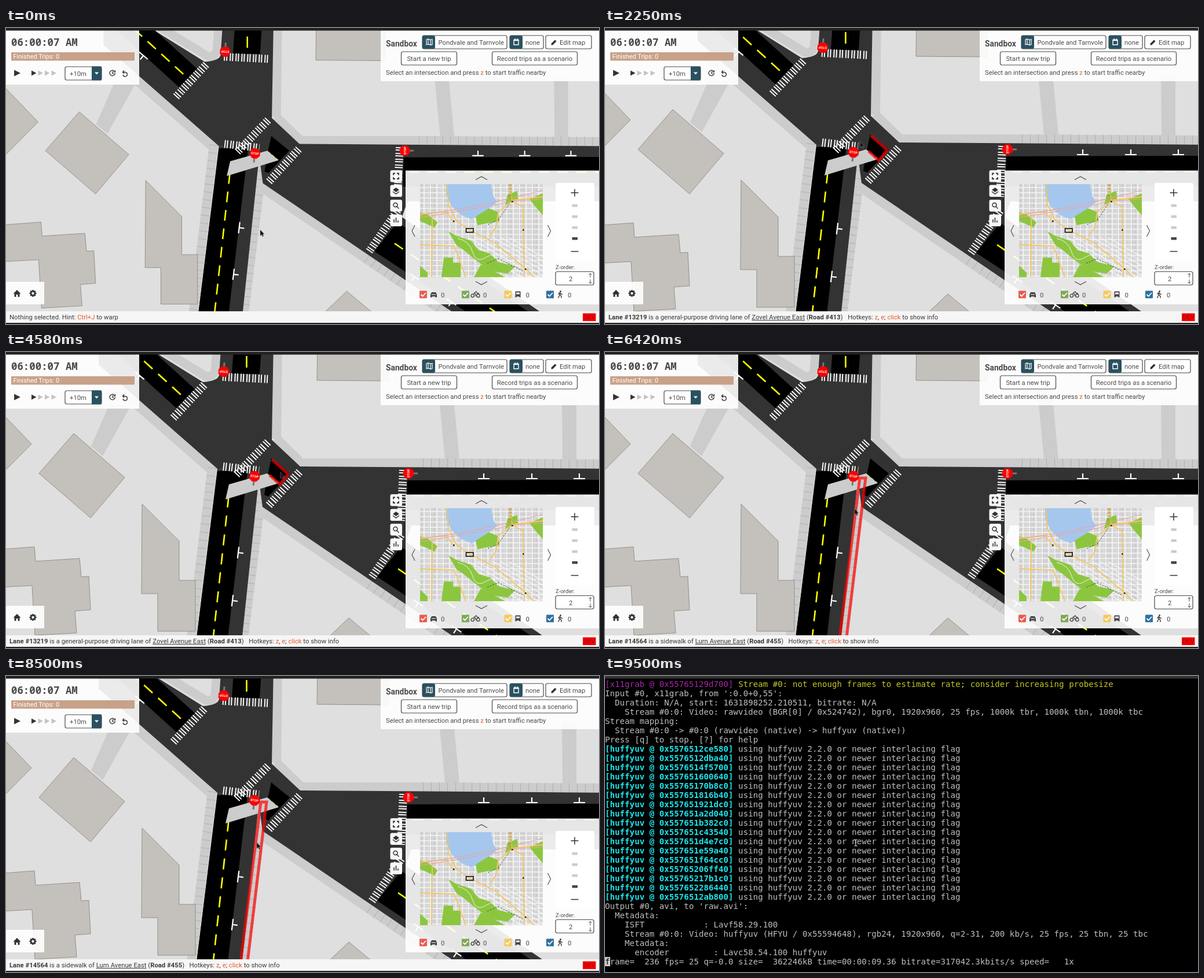
These frames come from a looping animation (1024 px wide and 512 px high, 9.66 s). An HTML page:

```html
<!DOCTYPE html>
<html>
<head>
<meta charset="utf-8">
<style>
html, body { margin: 0; width: 100%; height: 100%; overflow: hidden; background: #222 }
svg, #hint, #term { position: absolute; left: 0; top: 0 }
svg text { font: 11.3px Roboto, sans-serif; fill: #4a4a4a }
#hint { left: 6px; top: 490px; font: 11.3px/22px Roboto, sans-serif; color: #3a3a3a; white-space: pre }
#hint i, tspan { font-style: normal; color: #e8572a; fill: #e8572a }
#term { margin: 0; width: 1024px; height: 506px; padding-top: 6px; background: #000; color: #bebebe;
  font: 14.17px/16px "DejaVu Sans Mono", monospace; overflow: hidden }
#term b { color: #1ce4ea }
#term s { text-decoration: none; color: #a626a6 }
#term u { text-decoration: none; color: #c4c426 }
#term i { font-style: normal; color: #000; background: #ccc }
</style>
</head>
<body>
<svg id="stage" width="1024" height="512" viewBox="0 0 1024 512"></svg>
<div id="hint"></div>
<pre id="term"></pre>
<svg width="1024" height="512">
  <rect id="strip" width="1024" height="4.5" fill="#222"/>
  <path id="arrow" d="M0 0V10.5L2.4 8.4L4 11.8L5.8 11L4.2 7.7H7.2Z" fill="#111" stroke="#999" stroke-width=".5"/>
  <path id="beam" d="M-3 -5h2l1 1l1-1h2M0-4V5M-3 6h2l1-1l1 1h2" fill="none" stroke="#ccc" stroke-width="1.2"/>
</svg>
<script>
const $ = id => document.getElementById(id);
const fill = (d, color, more = '') => `<path d="M${d}Z" fill="${color}" ${more}/>`;
const line = (d, color, width = 1, dash = '', more = '') =>
  `<path d="M${d}" fill="none" stroke="${color}" stroke-width="${width}" stroke-dasharray="${dash}" ${more}/>`;
const box = (x, y, w, h, color, more = '') =>
  `<rect x="${x}" y="${y}" width="${w}" height="${h}" fill="${color}" ${more}/>`;
const text = (x, y, s, more = '') => `<text x="${x}" y="${y}" ${more}>${s}</text>`;
const range = (a, b, step, f) => {
  let out = '';
  for (let v = a; v < b; v += step) out += f(v);
  return out;
};

const ROAD = '#333', WALK = '#ccc', LAND = '#dfdfdf', INK = '#4a4a4a', TEAL = '#2a5160';

// ---- street map ----
const walk = (d, ticks = true) => line(d, WALK, 16) + (ticks ? line(d, '#b0b0b0', 16, '1 13') : '');
const zebra = d => line(d, '#fff', 14, '1.9 2.3 1.9 4.2');
const building = d => fill(d, '#c4c1bc', 'stroke="#958f86"');
const bay = (x, y, turn) =>
  `<g transform="translate(${x} ${y}) rotate(${turn})">${line('-10 0h20M0 0v-9', '#fff', 2.2)}</g>`;
const stop = (x, y, turn) => {
  const corners = [...Array(8)].map((_, i) => {
    const a = (i + .5) * Math.PI / 4;
    return `${(9.8 * Math.cos(a)).toFixed(1)} ${(9.8 * Math.sin(a)).toFixed(1)}`;
  });
  return `<g transform="translate(${x} ${y}) rotate(${turn})">${line('0 8V16', '#777', 3)}
    ${fill(corners.join('L'), '#f80000')}
    ${text(0, 2, 'STOP', 'text-anchor="middle" style="font-size:5.6px;font-weight:700;fill:#fff"')}</g>`;
};

const streets = [
  box(-40, -20, 1104, 560, LAND),
  fill('748 80L773 80L783 186L758 186', WALK), fill('960 80H985V186H961', WALK),
  fill('178 92L216 92L167 180L147 163', WALK),
  // walks
  walk('180 51L359 208', false), walk('356 200L317 520'), walk('446 205L407 520'),
  walk('469 -20L467 150', false), walk('466 149L510 192L720 192', false), walk('720 192L1064 194'),
  walk('437 273L627 403', false), walk('627 403L800 521'),
  line('250 -16L345 42Q356 44 361 34L365 -20', WALK, 15),
  // pavement
  fill('160 22L365 202L438 206L405 520L326 520L365 202', ROAD),
  fill('160 -62L255 -1L340 52Q366 50 368 40L372 -20H462L459 152L508 198L1064 202V300H700L690 328L1064 585H850V545L443 268L435 208L365 202L160 22', ROAD),
  // driving lanes
  fill('180 -7L294 97L326 64L180 -69', '#000'), fill('394 -20H442L438 38H390', '#000'),
  fill('365 206L417 206L380 520L326 520', '#000'), fill('458 184L490 210L453 250L446 247L452 212', '#000'),
  fill('693 222L1064 221V274H692', '#000'), fill('641 389L682 337L1000 555L900 560', '#000'),
  // centre lines
  line('197 -22L302 74', '#ff0', 2.6, '20 13', 'stroke-dashoffset="10"'),
  line('415.5 -10V27', '#ff0', 2.6, '20 14', 'stroke-dashoffset="17"'),
  line('384.5 250L355 520', '#ff0', 2.6, '19 14'), line('677 375L900 527', '#ff0', 2.6, '18 16'),
  line('702 248.5H1064', '#ff0', 2, '19 14'),
  // traffic island
  fill('385 229L451 210L471 227L379 255', WALK), line('453 212L470 226', '#dd5', 1, '5 4'),
  ['289 114L345 54', '374 43L456 47', '398 212L454 154', '375 198L437 205', '454 265L508 206', '686 204L682 292',
    '632 389L684 314'].map(zebra).join(''),
  [825, 908, 990].map(x => bay(x, 219, 0)).join(''),
  bay(401, 347, 97), bay(391, 430, 97), bay(231, 41, 220), bay(712, 434, 214), bay(778, 479, 214),
  // buildings
  ['-30 82L44 159L-30 234', '117 141L205 217L146 287L57 210', '235 263L299 327V395H327V483H262V418H234',
    '-30 343L49 337L51 362L127 357L130 389L143 388L146 446L119 448L122 486L50 490L45 404L-30 408',
    '538 -20H660V50L537 49', '592 460L640 500L550 500'].map(building).join(''),
  stop(376, 34, 184), stop(429, 215, 7), stop(695, 210, -90)
].join('');

// ---- overview map ----
const overview = `<clipPath id="inset"><rect x="715" y="270" width="212" height="161"/></clipPath>
  <g clip-path="url(#inset)">` + [
  box(715, 270, 212, 161, '#d5d5d5'),
  range(718, 930, 5.5, x => line(`${x} 270V431`, x % 2 < 1 ? '#c4c4c4' : '#dedede', 1.6, '3 1.5')),
  range(276, 431, 9, y => line(`715 ${y}H927`, '#f6f6f6', 1.3)),
  range(722, 930, 11, x => line(`${x} 270V431`, '#f6f6f6', 1.5)),
  range(0, 8, 1, i => line(`${770 + i * 14} 362L${900 + i * 14} 436`, '#f6f6f6', 1.4)),
  fill('760 270H838L841 290L848 301L822 322L804 331L785 323L769 308L760 288', '#a5c7ee'),
  ['811 326L834 312L849 318L852 334L814 341', '904 296L927 286V324L915 310', '866 288L883 282L884 296L862 306',
    '715 319L727 322L745 336L740 345L715 334',
    '764 352L779 360L803 368L816 384L836 390L850 405L880 412L866 425L836 420L812 402L790 384L778 376',
    '756 397H772V406H785V431H752', '820 409L862 431H808', '715 411L728 423V431H715'].map(d => fill(d, '#8cc63f')).join(''),
  line('780 364Q800 368 806 388T830 396T868 402L880 416', '#eef4e4', 1),
  line('832 340L850 332L870 303M831 407L850 399L892 420', '#375a36', 1, '3 2'),
  ['762 270L764 305L778 334L800 349L845 372L899 418L912 431', '870 270L874 300L850 318L846 345L835 360',
    '874 300L893 309L895 431', '874 298L927 292', '715 322L760 318L774 336', '715 375L774 377L794 431',
    '736 323L735 431'].map(d => line(d, '#f5c65d', 1.8)).join(''),
  line('715 324L790 312L870 295L927 281M715 328L800 314L880 299L927 296', '#eda0a0', 1.1),
  line('869 270V296M872 270V296', '#a3802c', 1, '4 2'),
  [[874, 300], [897, 417], [773, 334], [893, 349]].map(([x, y]) => box(x - 1, y - 1, 2.5, 2.5, '#222')).join(''),
  box(794.5, 346.8, 12.5, 6.6, 'none', 'stroke="#000" stroke-width="1.5"')
].join('') + '</g>';

// ---- panels ----
const panel = (x, y, w, h) => box(x, y, w, h, '#fff', 'fill-opacity=".9"');
const button = (x, y, w, h = 23) => box(x, y, w, h, '#fff', `rx="3" stroke="${INK}" stroke-width="1.2"`);
const check = (x, color) => box(x - 6.5, 454.5, 13, 13, color, 'rx="1"') +
  line(`${x - 4} 461l3 3l5.5-6`, '#fff', 1.8) + text(x + 30.5, 465.5, '0');
const gear = range(0, 360, 45, a =>
  `<rect x="45.2" y="453" width="2.6" height="3.5" fill="#333" transform="rotate(${a} 46.5 459)"/>`);

const panels = [
  panel(0, 4, 230, 94), panel(647, 4, 377, 88), panel(690, 246.5, 334, 231.5), panel(0, 439, 66, 39),
  box(0, 490, 1024, 20, '#f6f6f6'), box(0, 510, 1024, 2, '#222'),
  // clock and speed
  text(9, 31, '06:00:07 AM', 'style="font:600 17.4px Noto Sans Mono,monospace"'),
  box(9, 42, 213, 14.5, '#c8a189'), text(12.5, 53.3, 'Finished Trips: 0', 'style="font-size:11px;fill:#fff"'),
  fill('14 72.5L25 78L14 83.5', '#333'),
  range(0, 4, 1, i => fill(`${44 + i * 11.5} 73.5l8.5 4.5l-8.5 4.5`, i ? '#c4c4c4' : '#333')),
  button(102, 67, 63), text(110, 82.5, '+10m'), box(148, 66.5, 17, 24, TEAL), fill('153 76.5h7l-3.5 4', '#fff'),
  line('187 74.5A4.7 4.7 0 1 0 188.5 78M184 75V78.5L186.5 80M188.5 73V76H185.5', '#333', 1.3),
  line('202 76.5H206A3.7 3.7 0 1 1 202 81M204 73.5L201.5 76.3L204 79', '#333', 1.4),
  // toolbox
  text(656, 31.5, 'Sandbox', 'style="font-size:13.8px;font-weight:700"'),
  button(719, 13, 146), box(719, 13, 22, 23, TEAL, 'rx="3"'),
  line('726 20l3-1l4 1.5l3-1v9l-3 1l-4-1.5l-3 1ZM729 19v10M733 20v10', '#fff', 1.2),
  text(746.5, 28.5, 'Pondvale and Tarnvole'),
  button(870, 13, 58), box(870, 13, 22, 23, TEAL, 'rx="3"'),
  line('877 20.5h8v8.5h-8ZM877 21.5h8M879 18v2M883 18v2', '#fff', 1.4), text(897, 28.5, 'none'),
  button(932, 13, 79), fill('941.5 29.5v-2.5l6.5-6.5l2.5 2.5l-6.5 6.5', '#333'), text(956, 28.5, 'Edit map'),
  button(682.5, 41, 96), text(730.5, 56.5, 'Start a new trip', 'text-anchor="middle"'),
  button(839.5, 41, 147), text(913, 56.5, 'Record trips as a scenario', 'text-anchor="middle"'),
  text(656, 81.3, 'Select an intersection and press <tspan>z</tspan> to start traffic nearby'),
  // home and settings
  fill('12.5 459.5L19 453L25.5 459.5H23.5V465H20.5V461H17.5V465H14.5V459.5', '#333'),
  gear, `<circle cx="46.5" cy="459" r="3.4" fill="none" stroke="#333" stroke-width="2.4"/>`,
  // side tools
  range(0, 4, 1, i => box(663.5, 246 + i * 25.5, 20.5, 20.5, '#f8f8f8', 'rx="3"')),
  line('669 254.5V251.5H672M675 251.5H678V254.5M678 258V261H675M672 261H669V258', '#333', 1.8),
  fill('673.5 276L679 280L673.5 284L668 280', '#333'), line('668 283L673.5 287L679 283', '#333', 1.5),
  line('675.3 309.3L678.5 312.5M676 306a3.5 3.5 0 1 1-7 0a3.5 3.5 0 1 1 7 0', '#333', 1.5),
  line('670 331V336.5M673.5 328V336.5M677 333V336.5', '#333', 1.6),
  overview,
  line('811 262.5L821 257L831 262.5M811 438.5L821 444L831 438.5M706 341L701 351L706 361M935.5 341L940.5 351L935.5 361', INK, 1.1),
  box(949, 268, 67, 135, '#fff', 'rx="3"'), line('975.5 285H988.5M982 278.5V291.5M975.5 386.5H988.5', '#333', 1.5),
  [307, 326, 345, 364].map(y => box(977.5, y - 2, 9.5, 4.5, y > 360 ? '#444' : '#ccc')).join(''),
  text(949, 417, 'Z-order:', 'style="font-size:9.6px"'), button(949, 421.5, 66), text(972, 437.5, '2'),
  line('1009 431.5V424.5M1006.5 427L1009 424.5L1011.5 427M1009 435V442M1006.5 439.5L1009 442L1011.5 439.5', INK, 1),
  check(720.5, '#ea5a52'), check(793.5, '#7fa85a'), check(867, '#f4c95d'), check(939.5, '#2f6f9f'),
  fill('733 466V461L735 457H742L744 461V466H741.5V464.5H735.5V466', '#444'), line('735 461H742', '#fff', 1),
  line('808.5 463a2.7 2.7 0 1 1-5.4 0a2.7 2.7 0 1 1 5.4 0M818 463a2.7 2.7 0 1 1-5.4 0a2.7 2.7 0 1 1 5.4 0M811 464V460.5L808 459L812 456L814 459H817', '#444', 1.3),
  fill('879.5 466V455.5H888.5V466H886.5V464.5H881.5V466', '#444'), box(881, 457.5, 6, 3, '#fff'),
  `<circle cx="957.5" cy="455.5" r="1.5" fill="#444"/>`,
  line('957 457.5L956 462L953.5 467M956.5 461.5L959 464V467M954 461L955 458.5L957 458L959 460.5H961', '#444', 1.5),
  box(996, 493.5, 22.5, 13.5, '#f00'), text(1007.3, 504, 'DEV', 'text-anchor="middle" style="font-size:11px;fill:#8a1010"')
].join('');

$('stage').innerHTML =
  `<g id="map">${streets}<path id="glow" fill="none" stroke="#f00" stroke-opacity=".7" stroke-width="5"/></g>${panels}`;

// ---- things under the pointer: outline and hint ----
const keys = list => `   Hotkeys: ${list.map(k => `<i>${k}</i>`).join(', ')}; <i>click</i> to show info`;
const lane = (id, kind, street, road, outline) =>
  [outline, `<b>Lane #${id}</b> is ${kind} of <u>${street}</u> (<b>Road #${road}</b>)` + keys(['z', 'e'])];
const node = (id, a, b, outline) =>
  [outline, `<b>Intersection #${id}</b> of <u>${a}</u> and <u>${b}</u>` + keys(['e', 'r', 'z'])];
const SIDE = 'a sidewalk', PARK = 'an on-street parking lane', DRIVE = 'a general-purpose driving lane';
const ZOVEL = 'Zovel Avenue East', LURN = 'Lurn Avenue East', WOMDAR = 'East Womdar Street';
const targets = {
  none: ['', 'Nothing selected. Hint: <i>Ctrl+J</i> to warp'],
  east: node(77, ZOVEL, WOMDAR, 'M515.7 185.6L694 184.6V323.5L624 412.5L432.6 277Z'),
  west: node(76, ZOVEL, LURN, 'M276 122L344 48L366 33L475 36L471 147L458 160L437 208L348 206Z'),
  zovelSide: lane(13221, SIDE, ZOVEL, 413, 'M470 148.5L511 187L506 193L465 154Z'),
  zovelPark: lane(13220, PARK, ZOVEL, 413, 'M460 158L504 197L490 210L459 184Z'),
  zovelDrive: lane(13219, DRIVE, ZOVEL, 413, 'M459 186L487 211L473 229L455 213'),
  lurnSide: lane(14564, SIDE, LURN, 455, 'M440 218H450L414 520H402Z'),
  lurnPark: lane(14563, PARK, LURN, 455, 'M418 214L438 216L402 520H380Z'),
  lurnDrive: lane(14562, DRIVE, LURN, 455, 'M392 208H416L380 520H355Z')
};
const hover = [[0, 'none'], [80, 'lurnSide'], [830, 'none'], [920, 'east'], [2170, 'zovelDrive'], [2330, 'west'],
  [3170, 'zovelSide'], [3500, 'east'], [4000, 'zovelPark'], [4500, 'zovelDrive'], [5170, 'lurnSide'], [6500, 'lurnPark'],
  [6750, 'lurnDrive'], [7000, 'lurnPark'], [7250, 'lurnSide'], [7830, 'east'], [8330, 'lurnSide']];
const pointer = [[0, 439, 349], [167, 430, 346], [667, 430, 346], [1250, 461, 285], [1917, 461, 285], [2500, 425, 130],
  [3000, 425, 130], [3333, 502, 183], [3667, 515, 225], [3750, 515, 225], [4167, 487, 190], [4333, 487, 190],
  [4583, 474, 208], [4833, 474, 208], [5583, 446, 250], [5917, 446, 250], [6083, 430, 279], [6167, 430, 279],
  [6417, 431, 271], [6700, 418, 285], [6917, 393, 290], [7167, 417, 283], [7333, 433, 278], [7667, 433, 278],
  [7917, 457, 268], [8083, 457, 268], [8500, 433, 288], [9660, 433, 288]];

// ---- terminal ----
const buffers = '12ce580 12dba40 14f5700 1600640 170b8c0 1816b40 1921dc0 1a2d040 1b382c0 1c43540 1d4e7c0 1e59a40 1f64cc0 206ff40 217b1c0 2286440 12ab800';
const shell = progress => `<s>[x11grab @ 0x55765129d700]</s> <u>Stream #0: not enough frames to estimate rate; consider increasing probesize</u>
Input #0, x11grab, from ':0.0+0,55':
  Duration: N/A, start: 1631898252.210511, bitrate: N/A
    Stream #0:0: Video: rawvideo (BGR[0] / 0x524742), bgr0, 1920x960, 25 fps, 1000k tbr, 1000k tbn, 1000k tbc
Stream mapping:
  Stream #0:0 -> #0:0 (rawvideo (native) -> huffyuv (native))
Press [q] to stop, [?] for help
${buffers.split(' ').map(b => `<b>[huffyuv @ 0x55765${b}]</b> using huffyuv 2.2.0 or newer interlacing flag`).join('\n')}
Output #0, avi, to 'raw.avi':
  Metadata:
    ISFT            : Lavf58.29.100
    Stream #0:0: Video: huffyuv (HFYU / 0x55594648), rgb24, 1920x960, q=2-31, 200 kb/s, 25 fps, 25 tbn, 25 tbc
    Metadata:
      encoder         : Lavc58.54.100 huffyuv
<i>f</i>rame=  ${progress}kbits/s speed=   1x`;
const early = shell('223 fps= 25 q=-0.0 size=  342016kB time=00:00:08.84 bitrate=316940.6');
const late = shell('236 fps= 25 q=-0.0 size=  362246kB time=00:00:09.36 bitrate=317042.3');

const put = (el, html) => { if (el.shown !== html) el.innerHTML = el.shown = html; };

function draw() {
  const t = performance.now() % 9660;
  const tick = Math.floor((t + 4) / (250 / 3)) * 250 / 3;
  const zoom = t < 1580 ? .9725 : t < 1670 ? .9865 : 1;
  $('map').setAttribute('transform', `translate(461 288) scale(${zoom}) translate(-461 -288)`);

  const [outline, hint] = targets[hover.filter(h => h[0] <= t).pop()[1]];
  $('glow').setAttribute('d', outline);
  put($('hint'), hint);

  const i = Math.max(1, pointer.findIndex(p => p[0] > tick));
  const [t0, x0, y0] = pointer[i - 1], [t1, x1, y1] = pointer[i];
  const f = (tick - t0) / (t1 - t0);
  const at = `translate(${x0 + (x1 - x0) * f} ${y0 + (y1 - y0) * f})`;
  $('arrow').setAttribute('transform', at);
  $('beam').setAttribute('transform', at);

  const inShell = t >= 9250;
  $('term').style.display = inShell ? '' : 'none';
  $('arrow').style.display = inShell ? 'none' : '';
  $('beam').style.display = inShell ? '' : 'none';
  $('strip').setAttribute('fill', inShell ? '#333' : '#222');
  put($('term'), t < 9500 ? early : late);
  requestAnimationFrame(draw);
}
draw();
</script>
</body>
</html>
```
